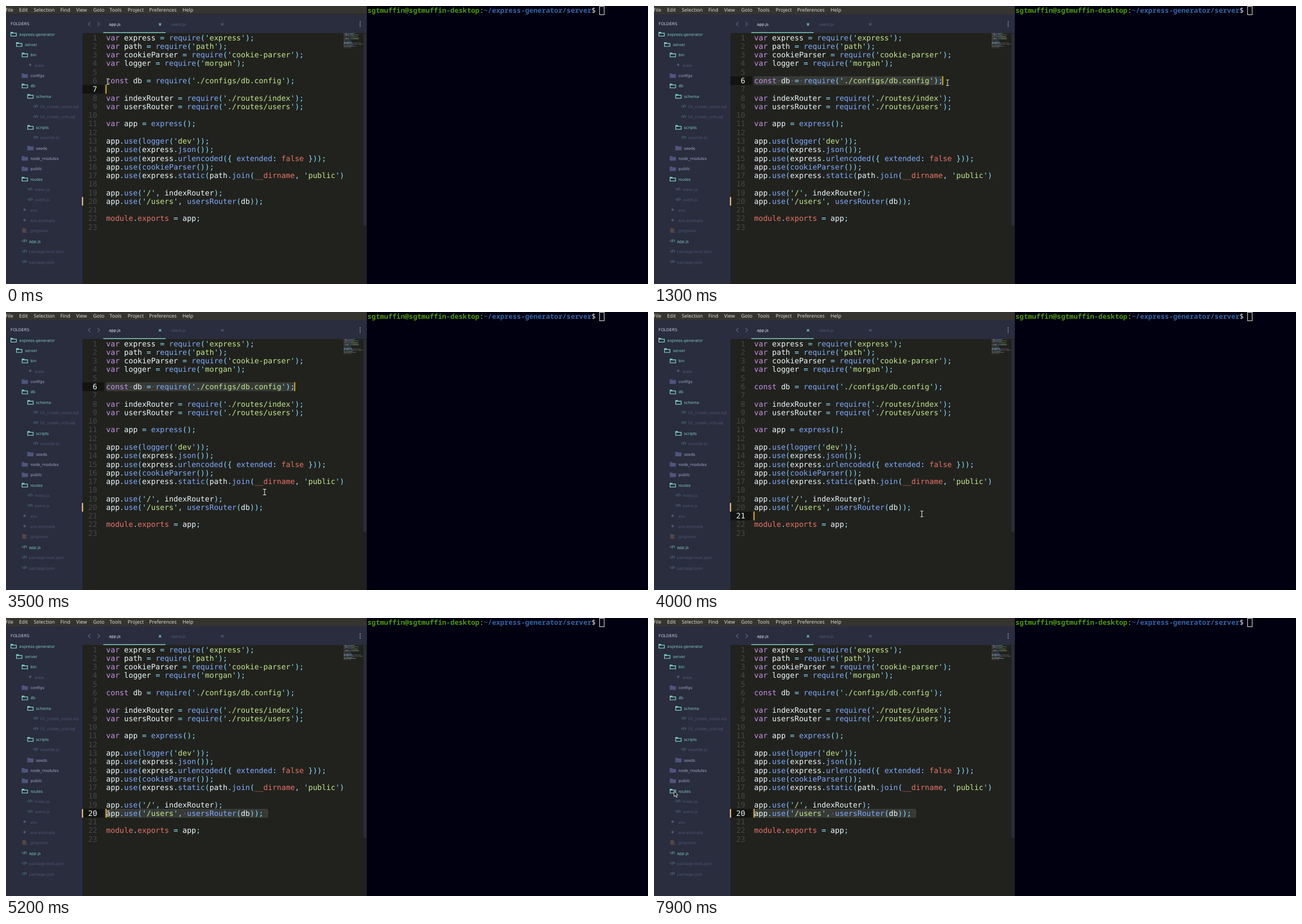
Write an HTML page with a canvas that moves like this. It is 1135 px wide and 493 px high and loops after 8000 ms.

```html
<!DOCTYPE html>
<html lang="en">
<head>
<meta charset="utf-8">
<title>Editor and terminal</title>
<style>
html, body { margin: 0; height: 100%; overflow: hidden; background: #010010; }
canvas { display: block; }
</style>
</head>
<body>
<canvas id="stage" width="1135" height="493"></canvas>
<script>
const ctx = document.getElementById('stage').getContext('2d');
ctx.textRendering = 'geometricPrecision';

const LOOP = 8000, STEP = 100;
const MONO = '"DejaVu Sans Mono", monospace', SANS = '"DejaVu Sans", sans-serif';
const CODE_X = 177, CHAR = 7.944, TOP = 48.4, LINE = 15.28;
const TEAL = '#80cbc4', DIM = '#4e5573', WHITE = '#eefaff', CYAN = '#89ddff',
  BLUE = '#82aaff', RED = '#e8746c', GREEN = '#c3e88d', PURPLE = '#c792ea';

const code = `var express = require('express');
var path = require('path');
var cookieParser = require('cookie-parser');
var logger = require('morgan');

const db = require('./configs/db.config');

var indexRouter = require('./routes/index');
var usersRouter = require('./routes/users');

var app = express();

app.use(logger('dev'));
app.use(express.json());
app.use(express.urlencoded({ extended: false }));
app.use(cookieParser());
app.use(express.static(path.join(__dirname, 'public')));

app.use('/', indexRouter);
app.use('/users', usersRouter(db));

module.exports = app;
`.split('\n');

// Sidebar rows: depth, kind, name
const tree = [
  [0, 'open', 'express-generator'], [1, 'open', 'server'], [2, 'open', 'bin'],
  [3, 'star', 'www'], [2, 'shut', 'configs'], [2, 'open', 'db'],
  [3, 'open', 'schema'], [4, 'code', '01_create_users.sql'], [4, 'code', '02_create_urls.sql'],
  [3, 'open', 'scripts'], [4, 'code', 'resetdb.js'], [3, 'shut', 'seeds'],
  [2, 'shut', 'node_modules'], [2, 'shut', 'public'], [2, 'open', 'routes'],
  [3, 'code', 'index.js'], [3, 'code', 'users.js'], [2, 'star', '.env'],
  [2, 'star', '.env.example'], [2, 'list', '.gitignore'], [2, 'active', 'app.js'],
  [2, 'code', 'package-lock.json'], [2, 'code', 'package.json']
];

const menu = [['File', -1], ['Edit', 23], ['Selection', 49], ['Find', 96], ['View', 124],
  ['Goto', 154], ['Tools', 183], ['Project', 215], ['Preferences', 253], ['Help', 312]];

// Pointer path: time, x, y
const path = [
  [0, 180, 134], [200, 184, 137], [300, 179, 133], [500, 179, 133], [900, 497, 146],
  [1000, 497, 146], [1300, 519, 136], [2000, 519, 136], [2100, 523, 142], [2200, 523, 142],
  [2400, 517, 177], [2500, 517, 177], [2700, 490.5, 237.5], [3000, 490.5, 237.5],
  [3400, 449, 300], [3700, 473.5, 358], [4000, 473.5, 358], [4200, 463, 350],
  [4600, 315, 342.5], [4800, 215, 346], [5300, 172, 347], [6100, 172, 347],
  [6200, 170.5, 348], [6800, 170.5, 348], [7100, 221, 340], [7300, 221, 340],
  [7700, 3, 318], [7900, 35.5, 307]
];

function pointer(t) {
  const i = path.findIndex(p => p[0] >= t);
  if (i < 1) return path[i ? path.length - 1 : 0].slice(1);
  const [a, b] = [path[i - 1], path[i]], k = (t - a[0]) / (b[0] - a[0]);
  return [1, 2].map(j => a[j] + (b[j] - a[j]) * k);
}

// Text position under the pointer
function hit([x, y]) {
  const line = Math.floor((y - TOP) / LINE) + 1;
  const col = Math.round((x - CODE_X) / CHAR);
  return { line, col: Math.max(0, Math.min(col, code[line - 1].length)) };
}

function selection(t) {
  if (t < 300) return [{ line: 7, col: 0 }, { line: 7, col: 0 }];
  if (t < 4000) return [{ line: 6, col: 0 }, hit(pointer(Math.min(t, 1300)))];
  return [{ line: 21, col: 0 }, hit(pointer(Math.min(t, 5300)))];
}

function tokens(line) {
  const out = [];
  for (const m of line.matchAll(/'[^']*'|\w+|[^\s\w]/g)) {
    const s = m[0], at = m.index;
    if (s.length > 1 && s[0] === "'") {
      out.push(["'", at, CYAN], [s.slice(1, -1), at + 1, GREEN], ["'", at + s.length - 1, CYAN]);
      continue;
    }
    let color = WHITE;
    if (/^(var|const)$/.test(s)) color = PURPLE;
    else if (/^(false|__dirname|module|exports)$/.test(s)) color = RED;
    else if (!/\w/.test(s)) color = CYAN;
    else if (s === 'extended' || line[at + s.length] === '(') color = BLUE;
    out.push([s, at, color]);
  }
  return out;
}
const lines = code.map(tokens);

function rect(x, y, w, h, color) {
  ctx.fillStyle = color;
  ctx.fillRect(x, y, w, h);
}
function text(s, x, y, color, font, align = 'left') {
  ctx.font = font;
  ctx.textAlign = align;
  ctx.fillStyle = color;
  ctx.fillText(s, x, y);
}
function stroke(d, color, width = 1) {
  ctx.strokeStyle = color;
  ctx.lineWidth = width;
  ctx.stroke(new Path2D(d));
}
function cross(x, y, color) {
  stroke(`M${x - 2} ${y - 2}l4 4m0 -4l-4 4`, color, 1.1);
}

function folder(x, y, open) {
  const color = open ? TEAL : '#4f557d';
  ctx.fillStyle = color;
  ctx.fill(new Path2D(`M${x} ${y - 4}h4l1.4 1.4h5.6v6.6h-11z`));
  if (open) rect(x + 1.3, y - 1.2, 8.4, 4, '#292d3e');
}
function fileIcon(kind, x, y) {
  if (kind === 'star') {
    stroke(`M${x} ${y - 2.5}v5m-2.2 -3.8l4.4 2.6m0 -2.6l-4.4 2.6`, '#626984', 0.9);
  } else if (kind === 'list') {
    stroke(`M${x - 4} ${y - 3}h6m-6 2h8m-8 2h6m-6 2h8`, '#80604f', 1);
  } else {
    stroke(`M${x - 2} ${y - 2}l-2 2l2 2m4 -4l2 2l-2 2m-1.2 -4.6l-1.6 5.2`,
      kind === 'active' ? TEAL : '#5b8590', 0.9);
  }
}

function drawSidebar() {
  rect(0, 14.5, 135, 478.5, '#292d3e');
  text('FOLDERS', 8, 34, '#c4c9dc', '7.2px ' + SANS);
  tree.forEach(([depth, kind, name], i) => {
    const y = 50 + i * 18.36, isFolder = kind === 'open' || kind === 'shut';
    if (isFolder) folder(8 + depth * 9.9, y, kind === 'open');
    else fileIcon(kind, 13 + depth * 9.9, y - 0.8);
    const color = kind === 'open' || kind === 'active' ? TEAL : kind === 'shut' ? '#a3a9c8' : DIM;
    text(name, (isFolder ? 23.6 : 21.2) + depth * 9.8, y + 2.6, color, '6.86px ' + SANS);
  });
}

function drawTabs() {
  rect(135, 14.5, 503, 33.5, '#292d3e');
  stroke('M149 28.5l-3.5 3.5l3.5 3.5M162 28.5l3.5 3.5l-3.5 3.5', '#59607c', 1.2);
  text('app.js', 182, 34.5, '#f2f5fa', '6.86px ' + SANS);
  text('users.js', 292, 34.5, '#565d7b', '6.86px ' + SANS);
  cross(272.3, 32.5, TEAL);
  cross(382.3, 32.5, '#565d7b');
  rect(172, 46.5, 110, 1.7, TEAL);
  for (let i = 0; i < 3; i++) rect(625.2, 27.3 + i * 3.7, 1.8, 1.8, '#8f96b3');
}

// Column range selected on a line, or null
function selected(n, from, to) {
  if (n < from.line || n > to.line) return null;
  const a = n === from.line ? from.col : 0;
  const b = n === to.line ? to.col : code[n - 1].length + 1;
  return a < b ? [a, b] : null;
}

function drawEditor(t) {
  rect(135, 48, 503, 445, '#21221d');
  const [anchor, caret] = selection(t);
  const forward = anchor.line - caret.line || anchor.col - caret.col;
  const [from, to] = forward < 0 ? [anchor, caret] : [caret, anchor];
  const font = '13.2px ' + MONO;

  rect(135, TOP + (caret.line - 1) * LINE, 38, LINE, '#131410');
  rect(134.3, TOP + 19 * LINE, 2, LINE, '#ffcb8b');

  code.forEach((line, i) => {
    const y = TOP + i * LINE, base = y + 12.2, n = i + 1, sel = selected(n, from, to);
    text(n, 161.2, base, n === caret.line ? WHITE : '#44474a', font, 'right');

    ctx.save();
    ctx.beginPath();
    ctx.rect(135, 48, 462.5, 445);
    ctx.clip();
    if (sel) {
      const [a, b] = sel;
      ctx.beginPath();
      ctx.roundRect(CODE_X + a * CHAR, y + 0.4, (b - a) * CHAR, LINE - 0.8, 2);
      ctx.fillStyle = '#373a37';
      ctx.fill();
      ctx.strokeStyle = '#484b47';
      ctx.lineWidth = 0.7;
      ctx.stroke();
      for (let c = a; c < b; c++) {
        if (line[c] === ' ') rect(CODE_X + (c + 0.5) * CHAR - 0.8, y + 7.2, 1.6, 1.6, '#6d716d');
      }
    }
    for (const [s, at, color] of lines[i]) text(s, CODE_X + at * CHAR, base, color, font);
    ctx.restore();

    // Minimap
    const my = 48.3 + i * 1.2;
    if (sel) rect(597 + sel[0] * 0.61, my - 0.1, (sel[1] - sel[0]) * 0.61, 1.2, '#45494a');
    ctx.globalAlpha = 0.5;
    for (const [s, at, color] of lines[i]) rect(597 + at * 0.61, my, s.length * 0.61, 0.75, color);
    ctx.globalAlpha = 1;
  });

  rect(CODE_X + caret.col * CHAR - 1, TOP + (caret.line - 1) * LINE - 0.3, 1.6, LINE + 0.5, '#ffcc00');
  rect(631, 48, 7, 445, '#1f201f');
  rect(632, 49, 5, 341, '#2b2e38');
}

function drawTerminal() {
  rect(638, 0, 497, 493, '#010010');
  const cell = 7.338;
  let col = 0;
  const put = (s, color, weight) => {
    text(s, 639 + col * cell, 12.2, color, `${weight} 12.23px "Noto Sans Mono", monospace`);
    col += s.length;
  };
  put('sgtmuffin@sgtmuffin-desktop', '#4e9a06', 'bold');
  put(':', '#e4e4e4', 'normal');
  put('~/express-generator/server', '#3465a4', 'bold');
  put('$ ', '#e4e4e4', 'normal');
  ctx.strokeStyle = '#e4e4e4';
  ctx.lineWidth = 1;
  ctx.strokeRect(1049.5, 0.5, 8, 15);
}

function drawPointer([x, y]) {
  if (x < 174) {
    const arrow = new Path2D(`M${x} ${y}v9.6l2.2 -2l1.7 3.6l1.6 -0.8l-1.7 -3.4h3z`);
    ctx.fillStyle = '#0b0b0b';
    ctx.fill(arrow);
    ctx.strokeStyle = '#f4f4f4';
    ctx.lineWidth = 0.9;
    ctx.stroke(arrow);
    return;
  }
  const beam = `M${x - 2.7} ${y - 5}h2l.7 .7l.7 -.7h2M${x} ${y - 4.3}v8.6M${x - 2.7} ${y + 5}h2l.7 -.7l.7 .7h2`;
  stroke(beam, '#141414', 2.4);
  stroke(beam, '#ececec', 1.1);
}

function draw(now) {
  const t = Math.floor(now % LOOP / STEP) * STEP;
  drawSidebar();
  drawTabs();
  drawEditor(t);
  rect(0, 0, 638, 14.5, '#35342f');
  for (const [s, x] of menu) text(s, x, 10.4, '#dedcd6', '8.75px "Noto Sans", sans-serif');
  drawTerminal();
  drawPointer(pointer(t));
  requestAnimationFrame(draw);
}
requestAnimationFrame(draw);
</script>
</body>
</html>
```
